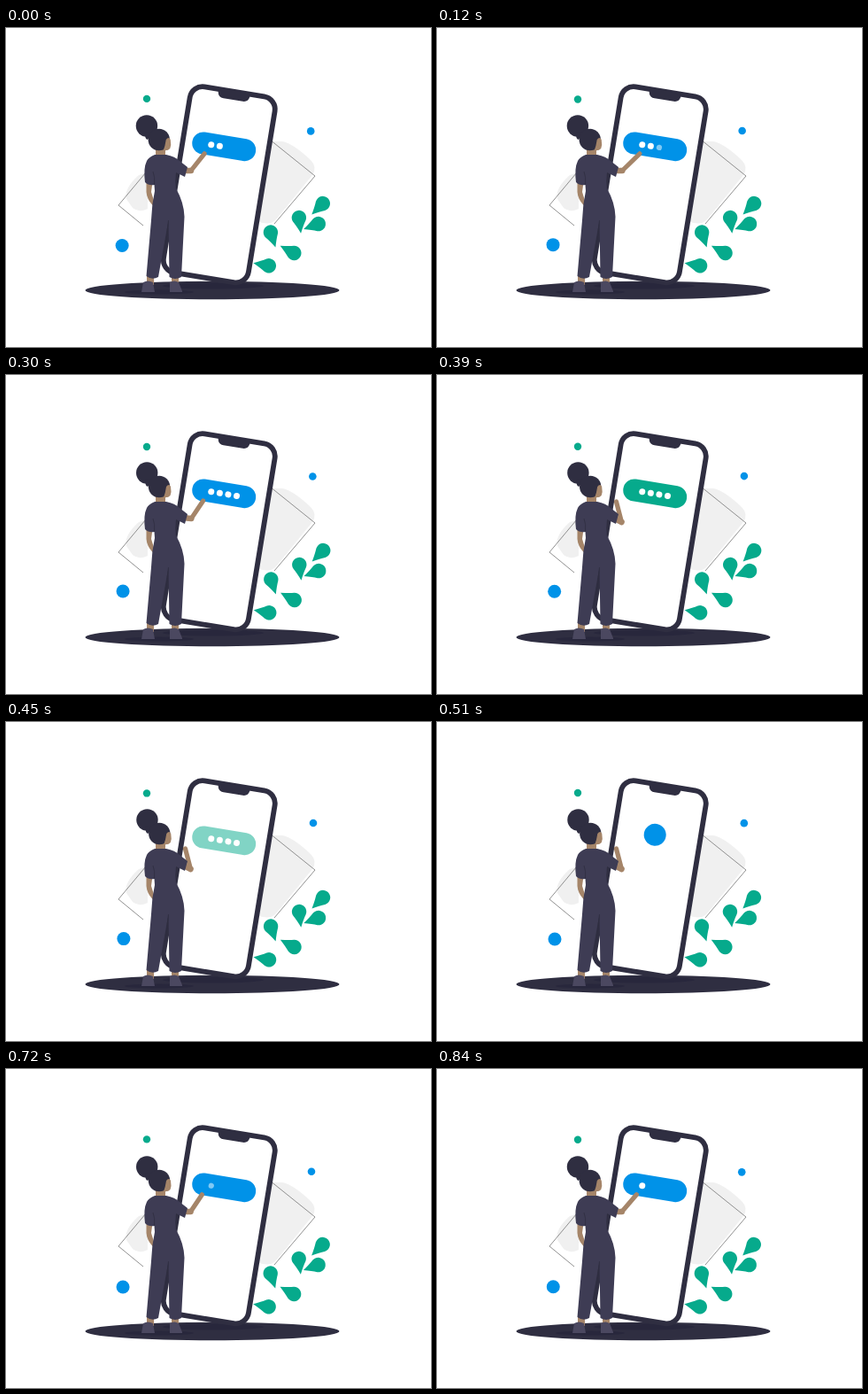
An HTML page that plays this animation: 480x360 px, repeating every 0.87 s.

```html
<!DOCTYPE html>
<html lang="en">
<head>
<meta charset="utf-8">
<title>Entering a passcode</title>
<style>
  html, body { margin: 0; width: 100%; height: 100%; overflow: hidden; background: #fff; }
  svg { display: block; width: 480px; height: 360px; }
  .ink { fill: #2f2e41; }
  .suit { fill: #3e3c54; }
  .skin { fill: #a58569; }
  .limb { fill: none; stroke: #a58569; stroke-linecap: round; }
  .blue { fill: #0092e8; }
  .green { fill: #06aa8c; }
  .line { fill: none; stroke: #858585; stroke-width: .9; }
</style>
</head>
<body>
<svg viewBox="0 0 480 360">
  <defs>
    <path id="leaf" d="M17.800 0Q9 4 4 7.200A8.200 8.200 0 1 1 4 -7.200Q9 -4 17.800 0Z"/>
  </defs>

  <!-- cards behind the phone -->
  <g fill="#f0f0f0">
    <path d="M290 128H312Q324 130 344 149Q352 157 346 166L305 216Q298 224 284 218Z"/>
    <path d="M160 163L150 166Q133 181 136 193L143 203Q150 209 160 204Z"/>
  </g>
  <path class="line" d="M298 126L349 167L303 221M158 163L127 200L155 223"/>

  <ellipse class="ink" cx="233" cy="296" rx="143.5" ry="10.2"/>
  <g fill="#24233a" opacity=".6">
    <ellipse cx="234" cy="291" rx="57" ry="3.5"/>
    <ellipse cx="173" cy="298" rx="39" ry="2.5"/>
  </g>

  <g transform="translate(240.8 176.8) rotate(9.3)">
    <rect x="-48.600" y="-106.300" width="97.200" height="212.600" rx="14.500" fill="#fff" stroke="#2f2e41" stroke-width="5.800"/>
    <path class="ink" d="M-18 -107H18V-103Q17 -97 11 -97H-11Q-17 -97 -18 -103Z"/>
  </g>
  <g id="field">
    <rect id="pill" y="-12.500" height="25" rx="12.500"/>
    <g id="digits" fill="#fff"></g>
  </g>

  <g id="leaves" class="green">
    <use href="#leaf" transform="translate(358 198) rotate(135)"/>
    <use href="#leaf" transform="translate(331 214) rotate(83)"/>
    <use href="#leaf" transform="translate(353 221) rotate(160)"/>
    <use href="#leaf" transform="translate(299 230.500) rotate(72)"/>
    <use href="#leaf" transform="translate(325.500 254) rotate(208)"/>
    <use href="#leaf" transform="translate(297 268.300) rotate(190)"/>
  </g>
  <circle id="dotGreen" class="green" cx="159" r="4.2"/>
  <circle id="dotLeft" class="blue" r="7.5"/>
  <circle id="dotRight" class="blue" r="4.3"/>

  <!-- woman -->
  <path class="skin" d="M158.500 174H165.500L164 185L168 198L165.500 200Q159 193 158.500 185ZM169 134H180V145H169ZM159 280H167V290H159ZM187 280H195V290H187Z"/>
  <path fill="#4b4860" d="M155 287Q160 284 166 287L168 298H153ZM185 287Q190 284 195 287L199 297V298H185Z"/>
  <path class="suit" d="M168.500 181H192Q201 197 201.500 213L198 281Q191 285 184.500 281L183.500 217L172 281Q165 285 158.500 280L164 217Q164.500 199 168.500 181Z"/>
  <path id="upper" class="limb" stroke-width="6.5"/>
  <path id="fore" class="limb" stroke-width="5.2"/>
  <path class="suit" d="M168 143H181Q191 145 196 150L205 157L202 168L192 163Q190.500 173 192 184H168L167.500 177Q161 178 157 174Q155 158 159 150Q161 146 168 143Z"/>
  <path fill="none" stroke="#2f2e41" stroke-width=".8" d="M167.500 177Q168.500 168 166 162M183.500 217Q181 238 180 248"/>
  <g id="head">
    <g class="ink">
      <circle cx="159.200" cy="110.500" r="12.200"/>
      <path d="M157 118L168 117L160 126Q157 125 157 118Z"/>
      <circle cx="173" cy="126" r="12.200"/>
    </g>
    <path class="skin" d="M181 126Q184 122 186 126L186.500 132L185.500 136Q183 139 178 138Q180 133 181 126Z"/>
  </g>
</svg>
<script>
const LOOP = 870, STEP = 30, ENTER = 480;
const DIGITS = 4, FIRST_DIGIT = 225, BEAT = 135;
const $ = id => document.getElementById(id);
const set = (el, attrs) => { for (const k in attrs) el.setAttribute(k, attrs[k]); };
const ramp = (t, a, b) => Math.min(1, Math.max(0, (t - a) / (b - a)));
const ease = (t, a, b) => { const p = ramp(t, a, b); return p * p * (3 - 2 * p); };
const mix = (a, b, p) => a + (b - a) * p;

const digits = Array.from({ length: DIGITS }, (_, i) => {
  const dot = document.createElementNS('http://www.w3.org/2000/svg', 'circle');
  set(dot, { cx: 9.7 * (i - (DIGITS - 1) / 2), cy: .3 });
  return $('digits').appendChild(dot);
});

// The field drops in as a ball, widens, fills with digits, turns green and fades
function drawField(u) {
  const width = mix(25, 72.6, ease(u, 60, 195));
  const y = mix(125.5, 133.8, ramp(u, 0, 140));
  const done = ramp(u, 690, 750);
  set($('field'), {
    transform: `translate(246.2 ${y}) rotate(9.3)`,
    opacity: ramp(u, 0, 30) - ramp(u, 810, 870)
  });
  set($('pill'), {
    x: -width / 2, width,
    fill: `rgb(${6 * done} ${mix(146, 170, done)} ${mix(232, 140, done)})`
  });
  digits.forEach((dot, i) => {
    const start = FIRST_DIGIT + BEAT * i, p = ramp(u, start, start + 30);
    set(dot, { r: mix(2.8, 3.5, p), opacity: p });
  });
}

// The hand reaches out, moves along while tapping once per digit, and returns
function drawArm(u) {
  const reach = ease(u, 140, 240) - ease(u, 660, 770);
  const tap = Math.cos(2 * Math.PI * (u - FIRST_DIGIT) / BEAT);
  const handX = mix(202.5, 219.5 + 10 * ramp(u, 240, 600) + 2.5 * tap, reach);
  const elbow = `${208.5 + reach * ramp(u, 240, 600)} ${mix(166, 161, reach)}`;
  set($('upper'), { d: `M199 161L${elbow}` });
  set($('fore'), { d: `M${elbow}L${handX} ${mix(143, 141.8, reach)}` });
}

function draw(t) {
  const u = (t + LOOP - ENTER) % LOOP;
  const wave = peak => Math.cos(2 * Math.PI * (t - peak) / LOOP);
  drawField(u);
  drawArm(u);
  set($('dotLeft'), { cx: 132 + wave(510), cy: 245 + wave(727) });
  set($('dotRight'), { cx: 345.6 + 1.4 * wave(440), cy: 115.2 - 1.2 * wave(440) });
  set($('dotGreen'), { cy: 80.2 + .8 * wave(270) });
  set($('leaves'), { transform: `translate(${.3 * wave(270)} 0)` });
  set($('head'), { transform: `translate(${.3 * wave(510)} 0)` });
}

const start = performance.now();
(function tick() {
  const t = (performance.now() - start) % LOOP;
  draw(Math.floor(t / STEP) * STEP);
  requestAnimationFrame(tick);
})();
</script>
</body>
</html>
```
